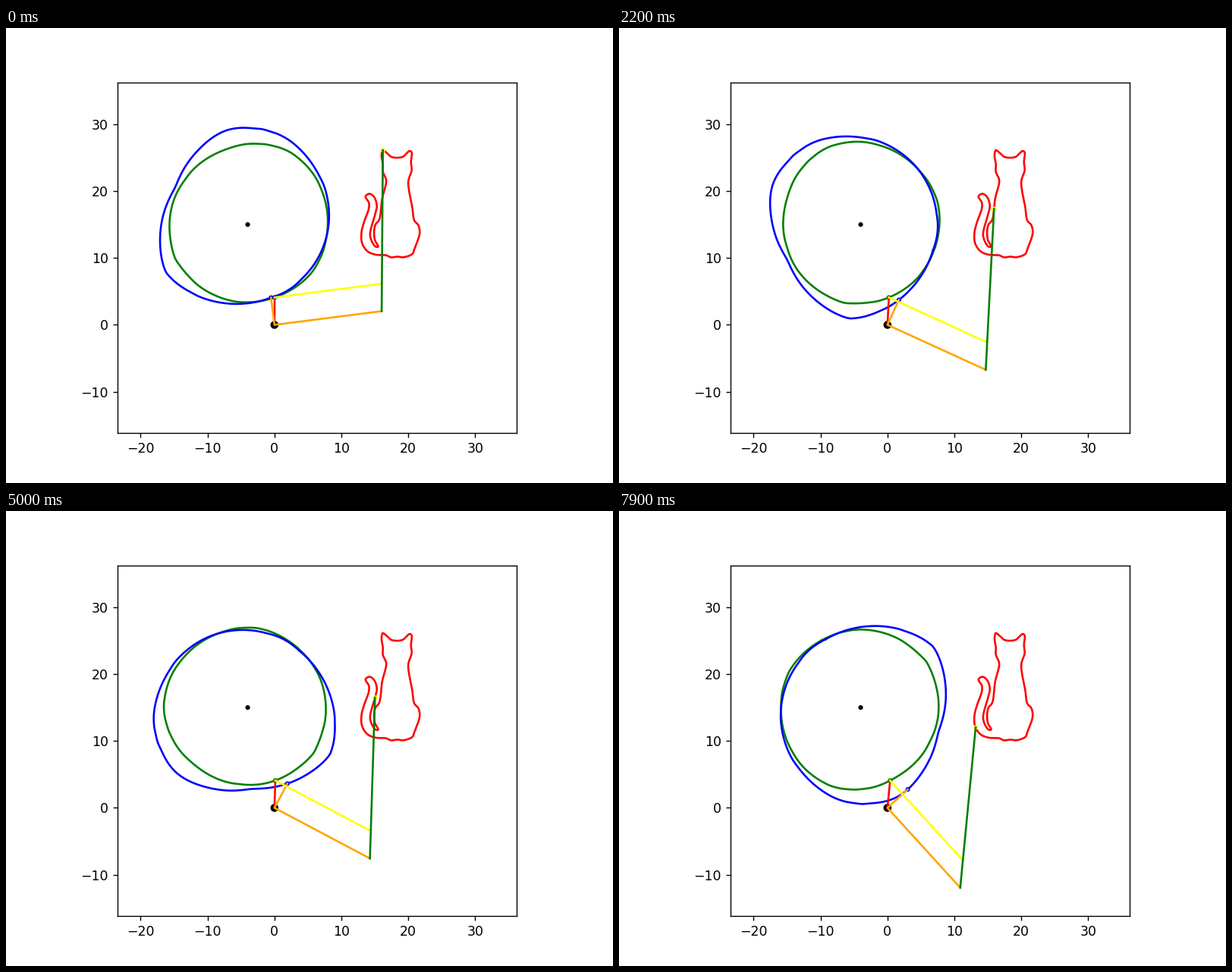
Write a matplotlib script that moves like this. It is 800 px wide and 600 px high and loops after 8 s.

```python
import numpy as np
import matplotlib.pyplot as plt
from matplotlib.animation import FuncAnimation
from matplotlib.patches import Circle

STEPS = 150                          # steps per turn of the cams
FRAMES = 80
SHORT, LONG, ARM = 4.1, 16.15, 24.05
HUB = -4 + 15j

# Key points of the cat, counterclockwise from the left ear
CAT = [
    (16.2, 26.1), (16, 25.4), (16.2, 24), (16.2, 22.9), (16.7, 21.6),   # head
    (16.1, 18.9), (15.65, 15.7), (15.1, 15), (14.9, 14.1),              # back
    (15, 12.7), (15.5, 11.7), (15.1, 11.7), (14.3, 13.3),               # tail
    (15, 16.4), (15.3, 17.8), (14.9, 19.1), (14.2, 19.6), (13.6, 19.2),
    (14.1, 18.3), (14.1, 17.4), (13.4, 15.4), (13, 13.8), (13.1, 12.2),
    (13.9, 11), (15.1, 10.5), (16.7, 10.4), (17.4, 10.1), (18.4, 10.2), # feet
    (19.2, 10.1), (20.6, 10.6), (20.9, 11.3), (21.7, 13.7),
    (21.5, 14.9), (20.9, 15.6), (20.6, 17.5), (20, 21.4),               # side
    (20.5, 23.1), (20.4, 24.3), (20.5, 25.8), (20.2, 26),               # face
    (19.1, 25.1), (17.5, 25.1), (16.9, 25.6),
]


def spline(p, sub=12):
    """Closed centripetal Hermite curve through complex points."""
    step = np.roll(p, -1) - p
    h = np.sqrt(abs(step))
    slope = step / h
    h0, slope0 = np.roll(h, 1), np.roll(slope, 1)
    m = (h * slope0 + h0 * slope) / (h + h0)
    a, d, m0, m1 = (v[:, None] for v in (p, step, h * m, h * np.roll(m, -1)))
    t = np.arange(sub) / sub
    curve = a + d * t**2 * (3 - 2 * t) + m0 * t * (1 - t)**2 - m1 * t**2 * (1 - t)
    return np.append(curve.ravel(), p[0])


def even_steps(curve, n):
    """Points at equal distances along a curve."""
    length = np.append(0, np.cumsum(abs(np.diff(curve))))
    s = length[-1] * np.arange(n) / n
    return np.interp(s, length, curve.real) + 1j * np.interp(s, length, curve.imag)


def xy(z):
    return np.real(z), np.imag(z)


outline = spline(np.array([complex(*q) for q in CAT]))
pen = even_steps(outline, STEPS)

# Inverse kinematics of the parallel linkage
reach = abs(pen)
bend = np.arccos((LONG**2 + reach**2 - ARM**2) / (2 * LONG * reach))
crank = np.exp(1j * (np.angle(pen) - bend))
elbow = LONG * crank
rocker = (pen - elbow) / ARM
roller1 = SHORT * rocker
roller2 = SHORT * 1j * crank

# Cam profiles: roller paths seen from the turning hub
turn = np.exp(2j * np.pi * np.arange(STEPS) / STEPS)
cam1, cam2 = (np.append(c, c[0]) for c in
              ((roller1 - HUB) / turn, (roller2 - HUB) / turn))

fig, ax = plt.subplots(figsize=(6.4, 4.8), dpi=125)
ax.set_aspect("equal")
ax.set_xlim(-23.45, 36.19)
ax.set_ylim(-16.16, 36.22)
ax.set_xticks(range(-20, 31, 10))
ax.set_yticks(range(-10, 31, 10))


def line(color):
    return ax.plot([], [], color=color, lw=1.5)[0]


def ring(color):
    return ax.add_patch(Circle((0, 0), 0.25, fill=False, ec=color, zorder=1.5))


ax.plot(*xy(outline), color="red", lw=1.5, zorder=1)
ax.add_patch(Circle((0, 0), 0.5, color="black"))
ax.add_patch(Circle(xy(HUB), 0.25, color="black"))
green_cam, blue_cam = line("green"), line("blue")
red, orange, yellow, green = map(line, ("red", "orange", "yellow", "green"))
rings = [ring(c) for c in ("green", "blue", "yellow")]


def update(i):
    green_cam.set_data(*xy(HUB + cam1 * turn[i]))
    blue_cam.set_data(*xy(HUB + cam2 * turn[i]))
    r1, r2, e, p = roller1[i], roller2[i], elbow[i], pen[i]
    red.set_data(*xy([0, r1]))
    orange.set_data(*xy([r2, 0, e]))
    yellow.set_data(*xy([r1, r1 + e]))
    green.set_data(*xy([e, p]))
    for patch, z in zip(rings, (r1, r2, p)):
        patch.center = xy(z)
    return [green_cam, blue_cam, red, orange, yellow, green, *rings]


anim = FuncAnimation(fig, update, frames=FRAMES, interval=100, repeat=True,
                     repeat_delay=0)
plt.show()
```
